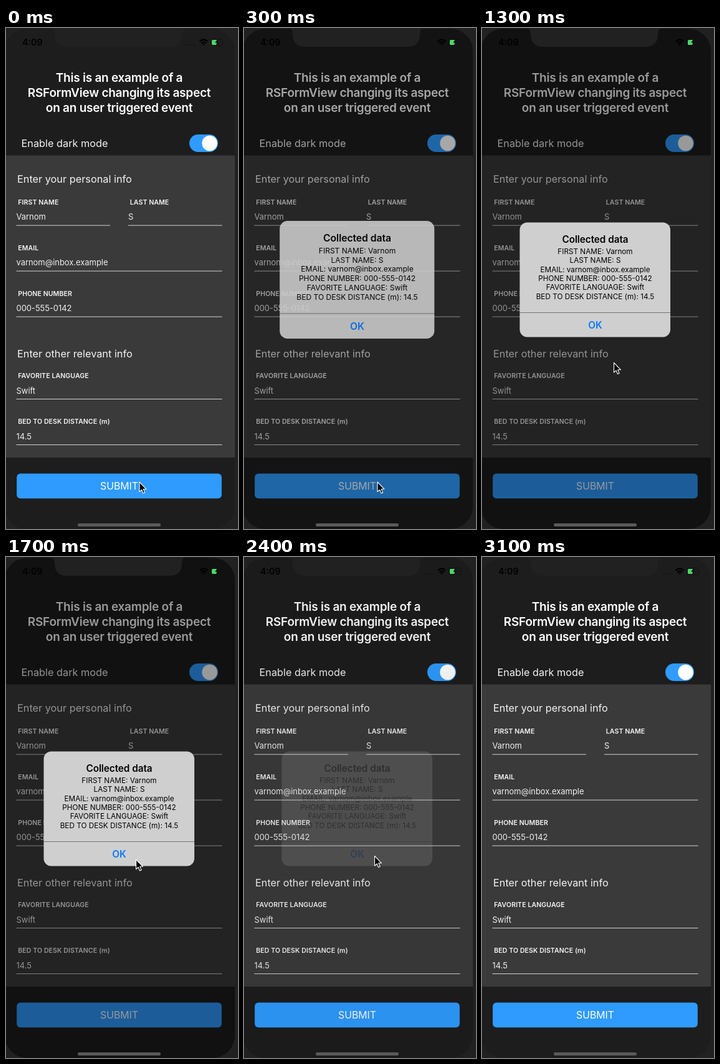
An HTML page that plays this animation: 372 px wide and 800 px high, repeating every 3900 ms.

```html
<!DOCTYPE html>
<html lang="en">
<head>
<meta charset="utf-8">
<title>Form with alert</title>
<style>
  html, body { margin: 0; width: 100%; height: 100%; overflow: hidden; background: #212121; }
  svg { display: block; width: 372px; height: 800px; font-family: Inter, "Open Sans", sans-serif; }
  .mid { text-anchor: middle; }
  .title { font-size: 19px; font-weight: 600; letter-spacing: -.24px; fill: #fff; }
  .head { font-size: 16.3px; fill: #f4f4f4; }
  .label { font-size: 10.6px; font-weight: 600; letter-spacing: .06px; fill: #f4f4f4; }
  .value { font-size: 13px; letter-spacing: -.05px; fill: #f0f0f0; }
  .rule { stroke: #d2d2d2; }
  .submit { font-size: 15.8px; fill: #fff; }
  .clock { font-size: 14.3px; font-weight: 600; }
  .strong { font-size: 15.3px; font-weight: 600; letter-spacing: -.05px; }
  .note { font-size: 11.75px; }
  .ok { fill: #0a7aff; }
</style>
</head>
<body>
<svg viewBox="0 0 372 800">
  <defs>
    <clipPath id="screen"><rect x="-2" y="1" width="369" height="799" rx="36"/></clipPath>
    <clipPath id="card"><rect x="60.5" y="310.5" width="241.5" height="183" rx="12"/></clipPath>
  </defs>
  <rect width="372" height="800" fill="#212121"/>
  <g clip-path="url(#screen)">
    <rect width="367" height="800" fill="#1d1d1d"/>
    <rect y="203.5" width="367" height="482.5" fill="#3a3a3a"/>

    <g class="title mid">
      <text x="181.5" y="86">This is an example of a</text>
      <text x="181.5" y="110">RSFormView changing its aspect</text>
      <text x="181.5" y="133.5">on an user triggered event</text>
    </g>
    <text class="head" x="24.5" y="190">Enable dark mode</text>
    <rect x="294" y="170" width="46" height="28" rx="14" fill="#2f9bff"/>
    <circle cx="326.5" cy="184" r="12.3" fill="#fff"/>

    <text class="head" x="18" y="247">Enter your personal info</text>
    <text class="head" x="18" y="525.5">Enter other relevant info</text>
    <g id="fields"></g>

    <rect x="17.2" y="711.5" width="328.6" height="39.8" rx="6" fill="#2f9bff"/>
    <text class="submit mid" x="181.5" y="737.3">SUBMIT</text>
    <rect id="dim" width="367" height="800"/>

    <text class="clock" x="26" y="28">4:09</text>
    <g fill="none" stroke="#000" stroke-width="2.2">
      <path d="M310.5 21.5Q317 15.5 323.5 21.5M313 24.5Q317 20.8 321 24.5"/>
      <path d="M317 28l-2-2.2q2-1.4 4 0z" fill="#000" stroke="none"/>
      <rect x="328.5" y="17.5" width="19" height="10.5" rx="3" stroke="#111" stroke-width="1"/>
      <path d="M289 27h14" stroke="#111" stroke-width="1.6" stroke-dasharray="2 2"/>
    </g>
    <rect x="330" y="19" width="8.5" height="8" rx="1.5" fill="#4cd964"/>
    <path d="M340 17l-5 6.5h3l-1.5 5.5 5.5-7h-3.2z" fill="#111"/>
  </g>
  <path d="M70 0Q78 1 78 9V10Q78 30 98 30H262Q282 30 282 10V9Q282 1 290 0Z" fill="#212121"/>
  <rect x="115" y="791" width="133" height="5" rx="2.5" fill="#5a5a5c"/>

  <g id="alert">
    <g clip-path="url(#card)">
      <rect x="60" y="310" width="243" height="184" fill="#cfcfcf"/>
      <rect id="press" x="60" y="454" width="243" height="40" fill="#a4a4a4"/>
      <path d="M60 454.5H303" stroke="#777"/>
    </g>
    <text class="strong mid" x="181.5" y="343">Collected data</text>
    <g id="notes" class="note mid"></g>
    <text class="strong ok mid" x="181.5" y="479.6">OK</text>
  </g>
  <path id="cursor" d="M0 0V15.5L3.6 12.3 6 18 8.6 17 6.2 11.3H11Z" stroke="#fff" stroke-width="1.1" stroke-linejoin="round"/>
</svg>
<script>
const LOOP = 3900, STEP = 100;
const OPEN = 80, CLOSE = 2190;
const $ = id => document.getElementById(id);

// label, value, left, right, underline y
const fields = [
  ["FIRST NAME", "Varnom", 16.5, 167, 315.2],
  ["LAST NAME", "S", 196, 346.5, 315.2],
  ["EMAIL", "varnom@inbox.example", 16.5, 346.5, 388.1],
  ["PHONE NUMBER", "000-555-0142", 16.5, 346.5, 461.1],
  ["FAVORITE LANGUAGE", "Swift", 16.5, 346.5, 592.5],
  ["BED TO DESK DISTANCE (m)", "14.5", 16.5, 346.5, 665.5]
];

$("fields").innerHTML = fields.map(([label, value, x1, x2, y]) => `
  <text class="label" x="${x1 + 2.8}" y="${y - 33.2}">${label}</text>
  <text class="value" x="${x1}" y="${y - 8.9}">${value}</text>
  <path class="rule" d="M${x1} ${y}H${x2}"/>`).join("");

$("notes").innerHTML = fields.map(([label, value], i) =>
  `<text x="181.5" y="${361 + i * 14.35}">${label}: ${value}</text>`).join("");

// time, x, y
const path = [
  [0, 214, 725], [600, 214, 725], [700, 215.5, 719.5], [800, 214, 716],
  [1000, 213.5, 706], [1300, 211.5, 534.5], [1500, 208.5, 498],
  [1700, 208.5, 483], [1900, 208.5, 483], [2000, 209.5, 477.5], [LOOP, 209.5, 477.5]
];

function cursorAt(t) {
  const i = path.findIndex(p => p[0] > t);
  const [t0, x0, y0] = path[i - 1], [t1, x1, y1] = path[i];
  const k = (t - t0) / (t1 - t0);
  return [x0 + (x1 - x0) * k, y0 + (y1 - y0) * k];
}

// critically damped spring from 0 to 1
function spring(ms) {
  if (ms <= 0) return 0;
  if (ms > 550) return 1;
  const x = ms * 0.016;
  return 1 - (1 + x) * Math.exp(-x);
}

function draw(time) {
  const t = Math.floor((time % LOOP) / STEP) * STEP;
  const shown = spring(t - OPEN), gone = spring(t - CLOSE);
  const level = shown * (1 - gone);
  const scale = 1.2 - 0.2 * shown;
  $("dim").setAttribute("opacity", 0.4 * level);
  $("alert").setAttribute("opacity", level);
  $("alert").setAttribute("transform",
    `translate(181.5 402) scale(${scale}) translate(-181.5 -402)`);
  $("press").setAttribute("opacity", t >= 2000 && t <= 2300 ? 1 : 0);
  $("cursor").setAttribute("transform", `translate(${cursorAt(t)})`);
  $("cursor").setAttribute("opacity", t < 3000 ? 1 : 0);
}

const start = performance.now();
function tick() {
  draw(performance.now() - start);
  requestAnimationFrame(tick);
}
tick();
</script>
</body>
</html>
```
